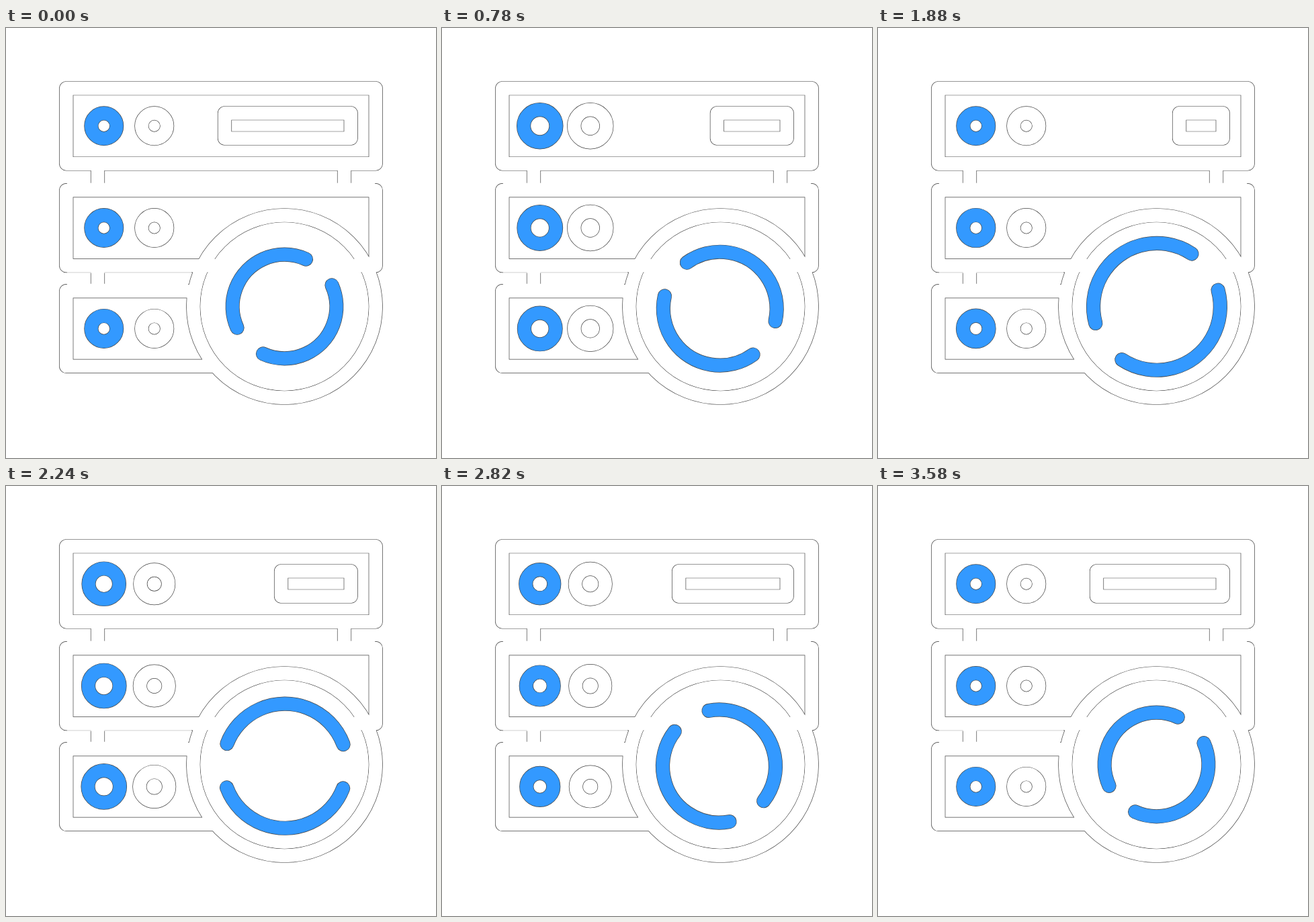
These frames come from a looping animation (640 px wide and 640 px high, 3.6 s). An HTML page with a canvas:

```html
<!DOCTYPE html>
<html>
<head>
<meta charset="utf-8">
<style>
  html, body { margin: 0; width: 100%; height: 100%; overflow: hidden; background: #fff; }
  canvas { display: block; }
</style>
</head>
<body>
<canvas id="stage" width="640" height="640"></canvas>
<script>
const ctx = document.getElementById('stage').getContext('2d');
const LOOP = 3600, SPAN = 3580, HALF = SPAN / 2;
const WIDTH = 20.5, EDGE = 0.7;
const BLUE = '#3399ff', WHITE = '#fff', DARK = '#444';
const ROWS = [145.75, 297.5, 447.4];
const HUB = 414.5;

const smooth = u => u * u * (3 - 2 * u);
const clamp = u => Math.max(0, Math.min(1, u));

// Cubic easing with control points (x1, 0) and (x2, 1).
function ease(u, x1, x2) {
  let low = 0, high = 1;
  for (let i = 0; i < 24; i++) {
    const s = (low + high) / 2, r = 1 - s;
    if (3 * s * r * r * x1 + 3 * s * s * r * x2 + s * s * s < u) low = s;
    else high = s;
  }
  return smooth(low);
}

// A thick line with a hairline along both of its edges.
function outline(path, color, cap = 'butt') {
  ctx.lineCap = cap;
  ctx.lineJoin = 'round';
  for (const [style, width] of [[DARK, WIDTH + EDGE], [color, WIDTH - EDGE]]) {
    ctx.strokeStyle = style;
    ctx.lineWidth = width;
    ctx.stroke(path);
  }
}

function circle(x, y, r) {
  const path = new Path2D();
  path.arc(x, y, r, 0, 2 * Math.PI);
  return path;
}

const frame = new Path2D();
frame.rect(89.75, 89.75, 460.5, 112.25);
frame.rect(89.75, 241.6, 460.5, 112.1);
for (const [x, y, height] of [[136.5, 202, 39.6], [503.5, 202, 39.6], [136.5, 353.7, 37.9]]) {
  frame.moveTo(x, y);
  frame.lineTo(x, y + height);
}
frame.moveTo(281, 391.6);
frame.lineTo(89.75, 391.6);
frame.lineTo(89.75, 503.4);
frame.lineTo(311, 503.4);
frame.addPath(circle(HUB, HUB, 135.75));

function drawFrame() {
  outline(frame, WHITE);
  ctx.fillStyle = WHITE;
  ctx.fill(circle(HUB, HUB, 125));
  // These three edges only show at their rounded corners.
  ctx.fillRect(91, 230.7, 458, 1.3);
  ctx.fillRect(91, 363.3, 185, 1.3);
  ctx.fillRect(91, 380.7, 180, 1.3);
}

function drawLights(t) {
  const pulse = delay => {
    const u = clamp((t % HALF - delay) / 1200);
    return smooth(1 - Math.abs(2 * u - 1));
  };
  ROWS.forEach((y, row) => {
    const delay = (2 - row) * 40;
    outline(circle(145.75, y, 18.9 + 5.7 * pulse(delay)), BLUE);
    outline(circle(220.75, y, 18.9 + 5.2 * pulse(delay + 120)), WHITE);
  });
}

function drawSlot(t) {
  const u = t / HALF;
  const shift = u < 1 ? ease(u, 0.33, 0.27) : 1 - ease(u - 1, 0.15, 0.46);
  const left = 325.5 + 126.7 * shift;
  const slot = new Path2D();
  slot.rect(left, 126.75, 513.25 - left, 37.5);
  outline(slot, WHITE);
}

function drawSpinner(t) {
  const turn = 2 * Math.PI * t / SPAN;
  const radius = 77.3 + 17.2 * ease(1 - Math.abs(t / HALF - 1), 0.42, 0.54);
  const sway = Math.sin(turn), half = 69.3 * Math.PI / 180;
  const arcs = new Path2D();
  ctx.save();
  ctx.translate(HUB, HUB);
  ctx.rotate(turn);
  ctx.translate(3 * sway, 1.4 * sway);
  for (const middle of [Math.PI / 4, Math.PI * 5 / 4]) {
    const start = middle - half;
    arcs.moveTo(radius * Math.cos(start), radius * Math.sin(start));
    arcs.arc(0, 0, radius, start, middle + half);
  }
  outline(arcs, BLUE, 'round');
  ctx.restore();
}

function draw() {
  const t = Math.min(performance.now() % LOOP, SPAN - 0.01);
  ctx.fillStyle = WHITE;
  ctx.fillRect(0, 0, 640, 640);
  drawFrame();
  drawLights(t);
  drawSlot(t);
  drawSpinner(t);
  requestAnimationFrame(draw);
}
draw();
</script>
</body>
</html>
```
